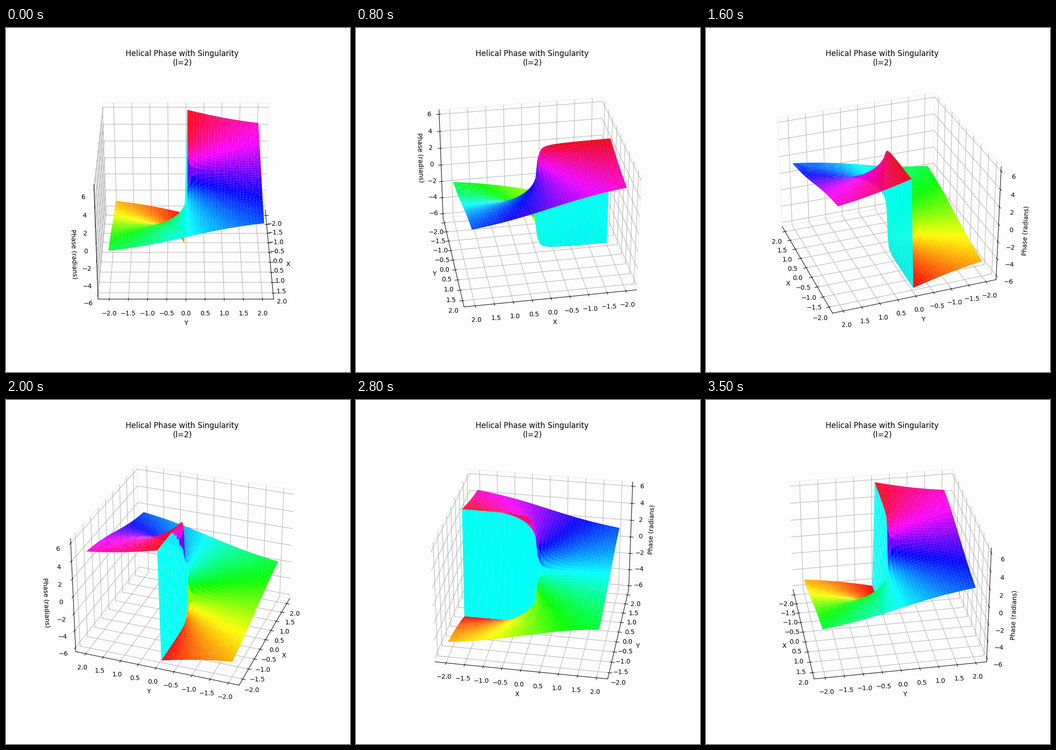
Recreate the animation shown at these times as a matplotlib script. Size 748 by 748 pixels, loop 3.6 s.

```python
import numpy as np
import matplotlib.pyplot as plt
from matplotlib.animation import FuncAnimation

SIZE, DPI = 748, 100
FRAMES, INTERVAL = 36, 100
CHARGE = 2
BACKGROUND = "#fdfdfd"

axis_points = np.linspace(-2, 2, 50)
x, y = np.meshgrid(axis_points, axis_points)
phase = CHARGE * np.arctan2(y, x)

fig = plt.figure(figsize=(SIZE / DPI, SIZE / DPI), dpi=DPI, facecolor=BACKGROUND)
ax = fig.add_subplot(projection="3d", facecolor=BACKGROUND)
ax.plot_surface(x, y, phase, cmap="hsv", rstride=1, cstride=1)

# Data range plus a 1/48 view margin on each side
grow = 25 / 24
ax.set_xlim(-2.2 * grow, 2.2 * grow)
ax.set_ylim(-2.2 * grow, 2.2 * grow)
ax.set_zlim(phase.min() * grow, phase.max() * grow)

for axis in (ax.xaxis, ax.yaxis, ax.zaxis):
    axis.set_pane_color((0.94, 0.94, 0.94, 1))
    axis.pane.set_fill(False)

ax.set_xlabel("X")
ax.set_ylabel("Y")
ax.set_zlabel("Phase (radians)")
ax.set_title(f"Helical Phase with Singularity\n(l={CHARGE})")


def update(frame):
    ax.view_init(elev=30, azim=frame * 360 / FRAMES)
    return []


anim = FuncAnimation(fig, update, frames=FRAMES, interval=INTERVAL, repeat=True)
plt.show()
```
